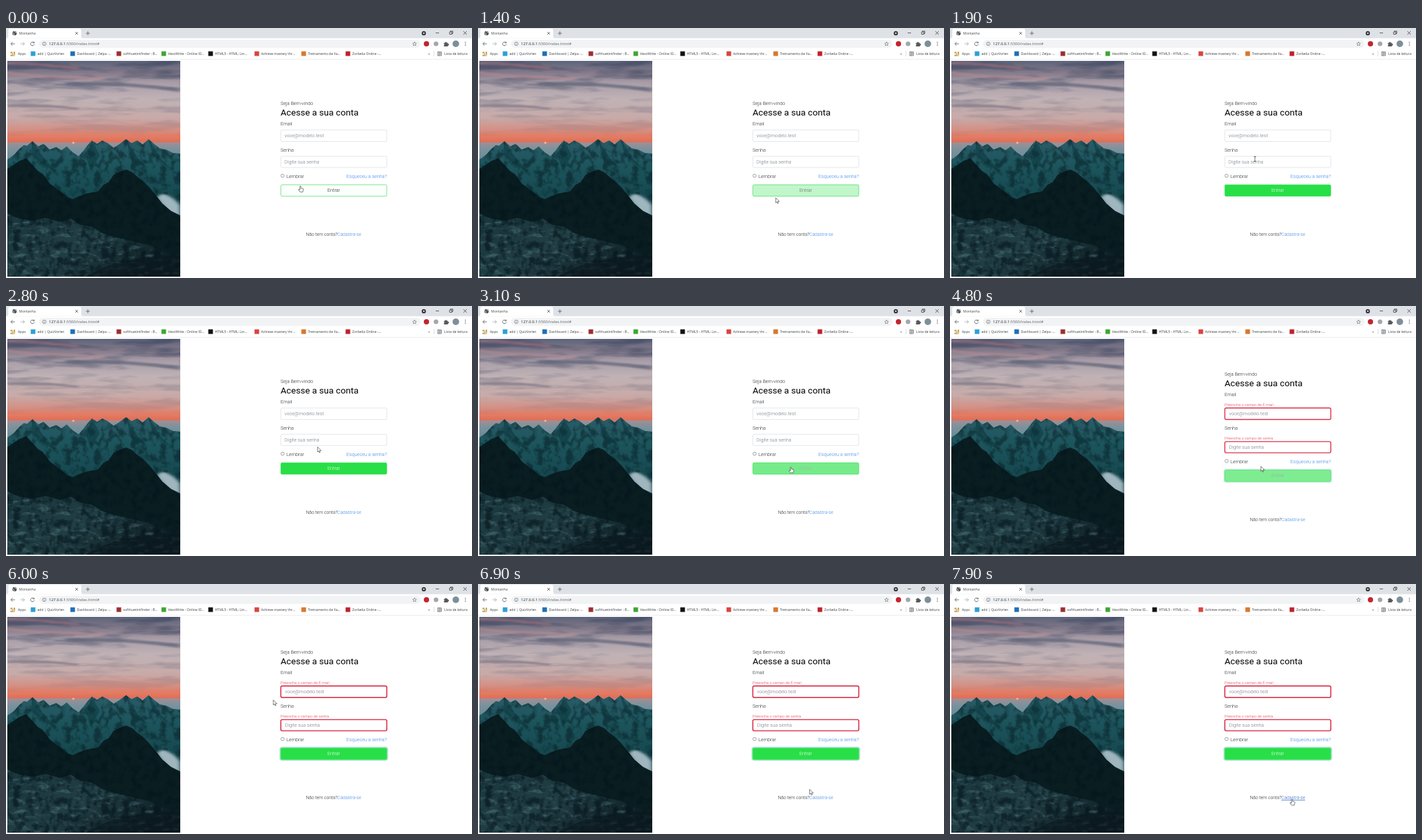
Write an HTML page that moves like this. It is 706 px wide and 380 px high and loops after 8 s.

```html
<!DOCTYPE html>
<html lang="pt-BR">
<head>
<meta charset="utf-8">
<title>Montanha</title>
<style>
  html, body { margin: 0; width: 100%; height: 100%; overflow: hidden; background: #fff; }
  svg { display: block; width: 100%; height: 100%; }
  text { white-space: pre; }
  .ui { font: 5.15px "Open Sans", "Noto Sans", sans-serif; fill: #3c4043; }
  .form { font: 300 7.28px Roboto, sans-serif; fill: #212529; }
  .title { font-size: 13.6px; font-weight: 400; fill: #000; }
  .hint { fill: #6c757d; }
  .link { fill: #3584e4; }
  .error { font-size: 5.9px; fill: #dc3545; }
  .small { font-size: 6.83px; }
  .line { fill: none; stroke: #5f6368; stroke-width: .9; }
</style>
</head>
<body>
<svg viewBox="0 0 706 380" xmlns="http://www.w3.org/2000/svg">
  <defs>
    <linearGradient id="sky" x1="0" y1="50" x2="0" y2="178" gradientUnits="userSpaceOnUse">
      <stop offset="0" stop-color="#5d647a"/>
      <stop offset=".14" stop-color="#847a8a"/>
      <stop offset=".26" stop-color="#a99ea8"/>
      <stop offset=".45" stop-color="#c0b2b5"/>
      <stop offset=".68" stop-color="#c8aaa8"/>
      <stop offset=".82" stop-color="#d48f83"/>
      <stop offset=".92" stop-color="#e2765f"/>
      <stop offset="1" stop-color="#d66c58"/>
    </linearGradient>
    <linearGradient id="fog" x1="0" y1="0" x2="0" y2="1">
      <stop offset="0" stop-color="#a08f94"/>
      <stop offset=".15" stop-color="#7a929d"/>
      <stop offset="1" stop-color="#4b7480"/>
    </linearGradient>
    <linearGradient id="far" x1="0" y1="0" x2="0" y2="1">
      <stop offset="0" stop-color="#2a5c67"/>
      <stop offset=".3" stop-color="#1d555d"/>
      <stop offset="1" stop-color="#0f3c43"/>
    </linearGradient>
    <linearGradient id="ground" x1="0" y1="0" x2="1" y2=".6">
      <stop offset="0" stop-color="#1a363d"/>
      <stop offset=".55" stop-color="#223e45"/>
      <stop offset="1" stop-color="#0d1d22"/>
    </linearGradient>
    <linearGradient id="skyFade" x1="0" y1="0" x2="0" y2="1">
      <stop offset="0" stop-opacity=".8"/>
      <stop offset=".4" stop-opacity=".4"/>
      <stop offset="1" stop-opacity=".05"/>
    </linearGradient>
    <filter id="blur" x="-20%" y="-80%" width="140%" height="260%"><feGaussianBlur stdDeviation="3 1.3"/></filter>
    <filter id="clouds" color-interpolation-filters="sRGB">
      <feTurbulence type="fractalNoise" baseFrequency=".011 .075" numOctaves="4" seed="8"/>
      <feColorMatrix values="0 0 0 0 .27  0 0 0 0 .3  0 0 0 0 .4  4 0 0 0 -1.8"/>
      <feComposite in2="SourceGraphic" operator="in"/>
    </filter>
    <filter id="shade" color-interpolation-filters="sRGB">
      <feTurbulence type="fractalNoise" baseFrequency=".09 .08" numOctaves="5" seed="3"/>
      <feColorMatrix values="0 0 0 0 .01  0 0 0 0 .08  0 0 0 0 .1  4 0 0 0 -1.75"/>
      <feComposite in2="SourceGraphic" operator="in"/>
    </filter>
    <filter id="light" color-interpolation-filters="sRGB">
      <feTurbulence type="fractalNoise" baseFrequency=".06 .16" numOctaves="5" seed="5"/>
      <feColorMatrix values="0 0 0 0 .36  0 0 0 0 .52  0 0 0 0 .55  4 0 0 0 -2.1"/>
      <feComposite in2="SourceGraphic" operator="in"/>
    </filter>
    <clipPath id="photo"><rect x="2" y="50" width="262" height="328"/></clipPath>
    <path id="ridge" d="M2 200L12 193L20 184L27 178L32 179L40 172L49 180L57 176L66 185L76 181L84 186L92 180L101 189L110 195L117 187L123 179L130 171L138 176L146 171L154 175L163 182L171 177L182 169L190 175L199 171L207 177L216 169L224 176L233 183L243 185L253 190L264 191V300H2Z"/>
    <path id="peaks" d="M2 214L12 208L20 202L31 198L38 206L48 217L56 222L66 236L80 247L93 257L101 260L110 256L121 252L130 250L139 249L148 238L156 234L163 223L172 219L182 215L191 219L199 226L208 233L217 242L226 253L237 267L250 278L264 285V378H2Z"/>
    <path id="rocks" d="M2 282L20 290L42 293L60 289L82 295L98 290L112 299L130 302L146 312L166 318L190 324L216 330L264 350V378H2Z"/>
  </defs>

  <!-- Landscape -->
  <g clip-path="url(#photo)">
    <rect x="2" y="50" width="262" height="130" fill="url(#sky)"/>
    <rect x="2" y="50" width="262" height="115" fill="url(#skyFade)" filter="url(#clouds)"/>
    <g filter="url(#blur)" fill="none">
      <path d="M0 54Q60 54 110 62" stroke="#b3757c" stroke-width="4" opacity=".5"/>
      <path d="M0 68Q60 76 150 77" stroke="#bd898e" stroke-width="4" opacity=".5"/>
      <path d="M90 85Q180 82 264 95" stroke="#5f6378" stroke-width="5" opacity=".7"/>
      <path d="M2 119Q50 116 110 123" stroke="#7b7482" stroke-width="3.500" opacity=".7"/>
      <path d="M0 165H264" stroke="#ea7d60" stroke-width="5" opacity=".4"/>
    </g>
    <rect x="2" y="174" width="262" height="70" fill="url(#fog)"/>
    <circle cx="102" cy="174.500" r="1.700" fill="#ffb18d"/>
    <use href="#ridge" fill="url(#far)"/>
    <use href="#ridge" filter="url(#shade)" opacity=".45"/>
    <path d="M40 172L58 199L74 218L57 208L38 192ZM130 171L142 193L128 218L122 196ZM182 169L197 195L216 214L190 202ZM216 169L236 200L254 217L222 193Z" fill="#0b343c" opacity=".5"/>
    <path d="M228 258Q236 249 246 255Q259 262 264 270V287L242 277Z" fill="#9fb6be" filter="url(#blur)"/>
    <use href="#peaks" fill="#0a1e22"/>
    <use href="#peaks" filter="url(#shade)" opacity=".5"/>
    <use href="#rocks" fill="url(#ground)"/>
    <use href="#rocks" filter="url(#light)" opacity=".42"/>
    <use href="#rocks" filter="url(#shade)" opacity=".6"/>
    <path d="M120 378Q170 346 264 346V378Z" fill="#0c1a1f" opacity=".65"/>
  </g>

  <!-- Browser window -->
  <g class="ui">
    <rect width="706" height="15.500" fill="#dee1e6"/>
    <path d="M1 15.500Q3.500 15 3.500 12V4Q3.500 1 6.500 1H111Q114 1 114 4V12Q114 15 116.500 15.500Z" fill="#fff"/>
    <circle cx="13" cy="8" r="3.300" fill="#4d5156"/>
    <path d="M10.500 7Q13 9 12 11M13 5Q14 7 16 7" fill="none" stroke="#fff" stroke-width=".8"/>
    <text x="20" y="9.900">Montanha</text>
    <path class="line" d="M105 6L109 10M109 6L105 10M121 8H127M124 5V11"/>
    <circle cx="633" cy="8" r="3.200" fill="#33363a"/>
    <path d="M631.500 7H634.500L633 9.500Z" fill="#fff"/>
    <path class="line" style="stroke:#222;stroke-width:.7" d="M651 7.500H656M672 6H675.500V9.500H672ZM673.300 6V4.700H677V8.300H675.500M693 5L698 10M698 5L693 10"/>
    <path class="line" d="M13.500 24H7.500M10 21.300L7.300 24L10 26.700"/>
    <path class="line" style="stroke:#a9acb0" d="M22 24H28M25.500 21.300L28.200 24L25.500 26.700"/>
    <path class="line" d="M42.200 22.200A2.800 2.800 0 1 0 42.800 24.700M42.800 20.700V22.700H40.600"/>
    <rect x="50" y="18" width="578" height="12.200" rx="6.100" fill="#f1f3f4"/>
    <circle class="line" cx="58" cy="24" r="2.700" style="stroke-width:.6"/>
    <path class="line" d="M58 23.600V25.600M58 22.300V22.900" style="stroke-width:.7"/>
    <text x="65" y="26.200" style="font-size:6px;fill:#202124">127.0.0.1<tspan fill="#5f6368">:5500/index.html#</tspan></text>
    <path class="line" style="stroke-width:.6" d="M619 21L619.900 23.100L622 23.300L620.400 24.700L620.900 26.900L619 25.700L617.100 26.900L617.600 24.700L616 23.300L618.100 23.100Z"/>
    <circle cx="637" cy="24" r="4" fill="#c4242f"/>
    <circle cx="651.500" cy="24" r="3.500" fill="#a4a7ab"/>
    <path d="M663.500 22.500H665.200A1.300 1.300 0 1 1 667.800 22.500H669.500V24A1.200 1.200 0 1 1 669.500 26.300V28H663.500V26.200A1.200 1.200 0 0 0 663.500 24Z" fill="#55595e"/>
    <circle cx="681.500" cy="24" r="5" fill="#7d8f98"/>
    <g fill="#5f6368"><circle cx="696" cy="21.500" r=".75"/><circle cx="696" cy="24" r=".75"/><circle cx="696" cy="26.500" r=".75"/></g>
    <g id="bookmarks"></g>
    <text x="18" y="41">Apps</text>
    <text x="639.500" y="41">»</text>
    <path d="M648.500 35V43" stroke="#cfd2d6" stroke-width=".7"/>
    <path class="line" style="stroke-width:.8" d="M654 36.200H659.500V42H654ZM656 36.200V42M656 38H659.500M656 40H659.500"/>
    <text x="664" y="41">Lista de leitura</text>
    <path d="M0 47.500H706" stroke="#e4e6e9" stroke-width=".7"/>
  </g>

  <!-- Login form -->
  <g class="form">
    <g id="head">
      <text x="416" y="117">Seja Bem-vindo</text>
      <text class="title" x="416" y="133.300">Acesse a sua conta</text>
      <text x="416" y="148.300">Email</text>
    </g>
    <g class="box"><rect x="416.400" y="155" width="160.500" height="17.500" rx="2"/><text class="hint" x="422" y="166.300">voce@modelo.test</text></g>
    <text x="416" y="188.300">Senha</text>
    <g class="errors">
      <text class="error" x="416" y="151.900">Preencha o campo de E-mail</text>
      <text class="error" x="416" y="202.900">Preencha o campo de senha</text>
    </g>
    <g id="lower">
      <g class="box"><rect x="416.400" y="195" width="160.500" height="17" rx="2"/><text class="hint" x="422" y="206.200">Digite sua senha</text></g>
      <circle cx="419" cy="224.600" r="2.500" fill="#fff" stroke="#666" stroke-width=".6"/>
      <text x="425" y="227.600">Lembrar</text>
      <text class="link" x="577" y="227.600" text-anchor="end">Esqueceu a senha?</text>
      <rect id="ring" x="415.300" y="237.300" width="162.600" height="19.400" rx="3" fill="none" stroke="#a3dfd0" stroke-width="1.600"/>
      <rect id="button" x="416.400" y="238.300" width="160.500" height="17.400" rx="2" stroke-width=".7"/>
      <text id="caption" x="496.500" y="249.400" text-anchor="middle">Entrar</text>
      <text class="small" x="454.500" y="316.200">Não tem conta?<tspan id="signup" class="link">Cadastra-se</tspan></text>
    </g>
  </g>

  <g id="cursor" stroke-linejoin="round" stroke-linecap="round">
    <path id="arrow" d="M0 0V7.200L1.700 5.700L2.800 8.200L4 7.700L2.900 5.200H5.100Z" fill="#fff" stroke="#222" stroke-width=".6"/>
    <path id="hand" d="M-.8 .7Q0-.5 .8 .7V3.300L4 4Q4.700 4.300 4.500 5.300L3.700 9.200H-.5L-3 5.700Q-2.600 4.300 -.8 5.700Z" fill="#fff" stroke="#222" stroke-width=".6"/>
    <path id="beam" d="M-1.300-3.500H1.300M0-3.500V3.500M-1.300 3.500H1.300" fill="none" stroke="#333" stroke-width=".7"/>
  </g>
</svg>

<script>
const LOOP = 8000, FRAME = 100, SHIFT = 11.1, ERRORS_AT = 4500;
const $ = id => document.getElementById(id);
const all = selector => [...document.querySelectorAll(selector)];

const bookmarks = [
  [41, '#2c9fd8', 'add | QuizVorlen'],
  [101, '#1c6fb8', 'Dashboard | Zelpa -...'],
  [171, '#9c2f2f', 'softhuetintfinder : B...'],
  [239, '#3fa535', 'VexoWrite - Online ID...'],
  [310, '#111', 'HTML5 - HTML: Lin...'],
  [380, '#d9433f', 'Achieve mastery thr...'],
  [451, '#d9772b', 'Treinamento de Xa...'],
  [518, '#c2202c', 'Zorbelia Online -...'],
];
const appColors = ['#ea4335', '#fbbc05', '#34a853'];
let bar = '';
for (let i = 0; i < 9; i++) {
  const column = i % 3, row = i / 3 | 0;
  bar += `<rect x="${7 + column * 2.5}" y="${36.2 + row * 2.4}" width="1.7" height="1.7" fill="${appColors[(column + row) % 3]}"/>`;
}
for (const [x, color, label] of bookmarks)
  bar += `<rect x="${x - 3.5}" y="35.5" width="7" height="7" fill="${color}"/><text x="${x + 6.5}" y="41">${label}</text>`;
$('bookmarks').innerHTML = bar;

// Pointer path: time, x, y
const path = [
  [0, 446, 240], [1200, 446, 240], [1300, 449, 258], [1500, 453, 259], [1700, 459, 226],
  [1900, 462, 199], [2100, 466, 161], [2300, 468, 160], [2600, 472, 190], [2900, 472, 227],
  [3000, 473, 240], [3100, 474, 244.5], [4500, 474, 244.5], [4700, 471.5, 244.5],
  [5000, 470, 243], [5400, 435, 205], [5800, 405, 176.7], [6000, 405, 176.7],
  [6300, 405, 240], [6500, 425, 275], [6700, 481, 299], [7100, 524, 326], [7400, 524, 326],
  [7500, 523, 327], [7600, 523, 327], [7900, 518, 327], [8000, 518, 327],
];

function pointerAt(t) {
  const i = path.findIndex(point => point[0] > t);
  const [t0, x0, y0] = path[i - 1], [t1, x1, y1] = path[i];
  const p = (t - t0) / (t1 - t0);
  return [x0 + (x1 - x0) * p, y0 + (y1 - y0) * p];
}

const ease = (t, start) => 1 - (1 - Math.min(1, Math.max(0, (t - start) / 600))) ** 1.75;
const mix = (a, b, p) => `rgb(${a.map((v, i) => Math.round(v + (b[i] - v) * p))})`;
const show = (element, visible) => element.setAttribute('visibility', visible ? 'visible' : 'hidden');
const moveY = (id, y) => $(id).setAttribute('transform', `translate(0 ${y})`);

function draw(t) {
  const failed = t >= ERRORS_AT, offset = failed ? SHIFT : 0;
  const green = ease(t, 1300) - ease(t, 2960) + ease(t, 4560);
  moveY('head', -offset);
  moveY('lower', offset);
  all('.errors').forEach(group => show(group, failed));
  all('.box').forEach(box => {
    const [frame, hint] = box.children;
    frame.setAttribute('fill', '#fff');
    frame.setAttribute('stroke', failed ? mix([224, 105, 120], [214, 20, 50], ease(t, 4500)) : '#ced4da');
    frame.setAttribute('stroke-width', failed ? 1.4 : .6);
    hint.setAttribute('x', failed ? 422.7 : 422);
  });

  $('button').setAttribute('fill', mix([251, 255, 251], [40, 223, 71], green));
  $('button').setAttribute('stroke', mix([70, 218, 97], [40, 223, 71], green));
  $('caption').style.fill = mix([33, 37, 41], [255, 255, 255], green);
  $('ring').setAttribute('opacity', failed ? green : 0);

  const [x, y] = pointerAt(t);
  const inside = (left, top, right, bottom) => x >= left && x <= right && y >= top && y <= bottom;
  const onLink = inside(502, 309 + offset, 539, 318 + offset);
  const onButton = inside(416, 238 + offset, 577, 256 + offset);
  const onField = inside(416, 154, 577, 173) || inside(416, 195 + offset, 577, 212 + offset);
  show($('hand'), onLink || onButton);
  show($('beam'), onField);
  show($('arrow'), !onLink && !onButton && !onField);
  $('cursor').setAttribute('transform', `translate(${x} ${y})`);
  $('signup').style.textDecoration = onLink ? 'underline' : 'none';
  $('signup').style.fill = onLink && t >= 7500 ? '#1f5fc4' : '';
}

function tick(now) {
  draw(Math.floor(now % LOOP / FRAME) * FRAME);
  requestAnimationFrame(tick);
}
draw(0);
requestAnimationFrame(tick);
</script>
</body>
</html>
```
